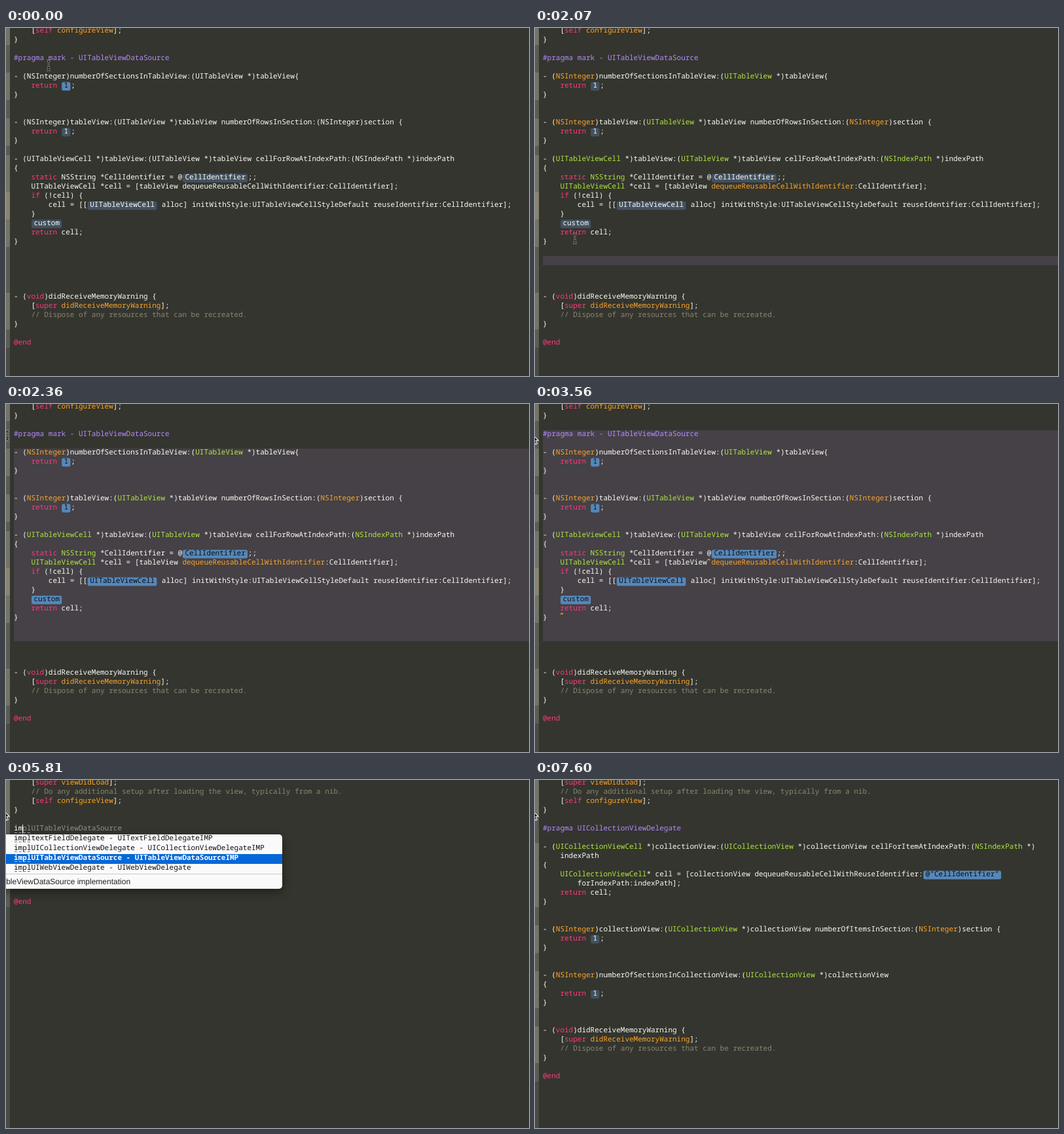
An HTML page with a canvas that plays this animation: 799 px wide and 531 px high, repeating every 8 s.

```html
<!DOCTYPE html>
<html>
<head>
<meta charset="utf-8">
<style>
html, body { margin: 0; width: 100%; height: 100%; overflow: hidden; background: #34352e; }
canvas { display: block; }
</style>
</head>
<body>
<canvas id="stage" width="799" height="531"></canvas>
<script>
const ctx = document.getElementById('stage').getContext('2d');
const W = 799, H = 531, LOOP = 8000;
const LEFT = 12, CHAR = 6.6, ROW = 14;
const MONO = '11px "Noto Sans Mono", "DejaVu Sans Mono", monospace';
const WHITE = '#fbfbf6', PINK = '#fc3a7d', ORANGE = '#fda428', GREEN = '#b0e73e',
      PURPLE = '#b48aff', GRAY = '#8a8672';
const rowTop = r => r * ROW - 2;

// ‹…› marks an editable placeholder
const setup = `    [super viewDidLoad];
    // Do any additional setup after loading the view, typically from a nib.
    [self configureView];
}
`;
const ending = `- (void)didReceiveMemoryWarning {
    [super didReceiveMemoryWarning];
    // Dispose of any resources that can be recreated.
}

@end`;
const tableDoc = `    [self configureView];
}

#pragma mark - UITableViewDataSource

- (NSInteger)numberOfSectionsInTableView:(UITableView *)tableView{
    return ‹1›;
}


- (NSInteger)tableView:(UITableView *)tableView numberOfRowsInSection:(NSInteger)section {
    return ‹1›;
}

- (UITableViewCell *)tableView:(UITableView *)tableView cellForRowAtIndexPath:(NSIndexPath *)indexPath
{
    static NSString *CellIdentifier = @‹CellIdentifier›;;
    UITableViewCell *cell = [tableView dequeueReusableCellWithIdentifier:CellIdentifier];
    if (!cell) {
        cell = [[‹UITableViewCell› alloc] initWithStyle:UITableViewCellStyleDefault reuseIdentifier:CellIdentifier];
    }
    ‹custom›
    return cell;
}





${ending}`.split('\n');
const emptyDoc = `${setup}



${ending}`.split('\n');
const collectionDoc = `${setup}
#pragma UICollectionViewDelegate

- (UICollectionViewCell *)collectionView:(UICollectionView *)collectionView cellForItemAtIndexPath:(NSIndexPath *)
    indexPath
{
    UICollectionViewCell* cell = [collectionView dequeueReusableCellWithReuseIdentifier:‹@"CellIdentifier"›
        forIndexPath:indexPath];
    return cell;
}


- (NSInteger)collectionView:(UICollectionView *)collectionView numberOfItemsInSection:(NSInteger)section {
    return ‹1›;
}


- (NSInteger)numberOfSectionsInCollectionView:(UICollectionView *)collectionView
{
    return ‹1›;
}


${ending}`.split('\n');

const choices = [
  ['impltextFieldDelegate', 'UITextFieldDelegateIMP'],
  ['implUICollectionViewDelegate', 'UICollectionViewDelegateIMP'],
  ['implUITableViewDataSource', 'UITableViewDataSourceIMP'],
  ['implUIWebViewDelegate', 'UIWebViewDelegate']
];

// [time, x, y] of the text pointer
const pointer = [
  [0, 65, 57], [890, 65, 72], [1040, 68, 140], [1190, 70, 235], [1330, 70, 335],
  [1480, 67, 393], [1630, 63, 384], [1770, 61, 366], [1920, 61, 355],
  [2070, 61, 321], [2210, 30, 182], [2360, 2, 48], [2510, 0, 40], [2660, 0, 47], [2810, 0, 55]
];
// [time, first selected row]
const selection = [[0, 99], [2070, 25], [2210, 15], [2360, 5], [2510, 3]];
const at = (steps, t) => steps.findLast(s => s[0] <= t);

function rect(x, y, w, h, color) {
  ctx.fillStyle = color;
  ctx.fillRect(x, y, w, h);
}

function text(str, x, y, color, weight = 500) {
  ctx.font = `${weight} ${MONO}`;
  ctx.fillStyle = color;
  ctx.fillText(str, x, y);
  return x + str.length * CHAR;
}

const TOKENS = /‹(?<slot>.*?)›|(?<note>\/\/.*)|(?<pragma>#pragma.*)|(?<key>@end|\b(?:static|return|if|void|self|super)\b)|(?<call>\b(?:configureView|viewDidLoad)\b)|(?<memory>(?<=super )didReceiveMemoryWarning)|(?<scalar>\b(?:NSInteger|dequeueReusableCellWithIdentifier)\b)|(?<type>\b(?:NSString|NSIndexPath|UITableView|UITableViewCell|UICollectionView|UICollectionViewCell)\b)/g;

function drawLine(line, row, s) {
  const top = rowTop(row), base = top + 9;
  const colors = {
    note: GRAY, pragma: PURPLE, key: PINK, call: ORANGE,
    memory: s.memory ? ORANGE : WHITE,
    scalar: s.types ? ORANGE : WHITE,
    type: s.types ? GREEN : WHITE
  };
  let x = LEFT, pos = 0;
  for (const m of line.matchAll(TOKENS)) {
    x = text(line.slice(pos, m.index), x, base, WHITE);
    pos = m.index + m[0].length;
    const slot = m.groups.slot;
    if (slot) {
      const on = row === s.active || row >= s.from && row < 26;
      ctx.fillStyle = on ? '#5687b9' : '#435260';
      ctx.beginPath();
      ctx.roundRect(x + .6, top + .5, slot.length * CHAR + 6.6, 13, 2.5);
      ctx.fill();
      x = text(slot, x + 4, base, on ? '#0b1016' : WHITE) + 4;
    } else {
      const kind = Object.keys(colors).find(k => m.groups[k]);
      x = text(m[0], x, base, colors[kind]);
    }
  }
  text(line.slice(pos), x, base, WHITE);
}

// Ribbon on the left: darker outside methods, lighter inside nested blocks
function drawRibbon(lines) {
  rect(0, 0, 6, H, '#4a4b45');
  let method = true, branch = false;
  lines.forEach((line, row) => {
    if (line.startsWith('- (')) method = true;
    if (line.startsWith('    if')) branch = true;
    rect(0, rowTop(row), 6, ROW, branch ? '#88846f' : method ? '#737468' : '#5b5c54');
    if (line === '    }') branch = false;
    if (line === '}') method = false;
  });
}

function dashes(x, y, color) {
  for (let i = 0; i < 4; i++) rect(x + i * CHAR + 1, y, 4, 1, color);
}

function drawPopup(picked, described) {
  ctx.save();
  ctx.shadowColor = 'rgba(0,0,0,.4)';
  ctx.shadowBlur = 14;
  ctx.shadowOffsetY = 5;
  ctx.fillStyle = '#fafafa';
  ctx.beginPath();
  ctx.roundRect(-20, 83, 442, 83, 5);
  ctx.fill();
  ctx.restore();
  choices.forEach(([name, result], i) => {
    const top = 83 + 15 * i, on = i === picked, color = on ? '#fff' : '#111';
    if (on) rect(0, top, 422, 15, '#0568d8');
    text(`${name} - ${result}`, LEFT, top + 9, color, on ? 700 : 500);
    dashes(LEFT, top + 11, on ? '#a9cbf2' : '#777');
  });
  rect(0, 143, 422, 1, '#c9c9c9');
  ctx.font = '12px "Liberation Sans", Arial, sans-serif';
  ctx.fillStyle = '#222';
  ctx.fillText(choices[described][0].slice(4) + ' implementation', -24.5, 159);
}

function drawBeam(x, y) {
  const path = new Path2D(`M${x - 3} ${y - 7.5}q3 0 3 2.5v10q0 2.5 -3 2.5M${x + 3} ${y - 7.5}q-3 0 -3 2.5M${x + 3} ${y + 7.5}q-3 0 -3 -2.5M${x - 2} ${y + 3.5}h4`);
  ctx.lineWidth = 2.4;
  ctx.strokeStyle = 'rgba(225,225,220,.75)';
  ctx.stroke(path);
  ctx.lineWidth = 1.2;
  ctx.strokeStyle = '#111';
  ctx.stroke(path);
}

function drawArrow() {
  const path = new Path2D('M-4.5 45.5V59.5L-1.2 56.5L1 61.5L3.2 60.5L1.2 55.8H5.2Z');
  ctx.fillStyle = '#111';
  ctx.fill(path);
  ctx.lineWidth = 1.1;
  ctx.strokeStyle = '#f4f4f4';
  ctx.stroke(path);
}

const caret = (x, row) => rect(x, rowTop(row), 1, ROW, '#f8f8f2');

function drawTyping(t) {
  const typed = 'im'.slice(0, t < 5210 ? 0 : t < 5360 ? 1 : 2);
  const picked = t < 6850 ? 2 : 1;
  const x = text(typed, LEFT, rowTop(5) + 9, WHITE);
  if (t >= 5810) {
    text(choices[picked][0].slice(2), x, rowTop(5) + 9, '#929289');
    dashes(LEFT, 80, '#aaa');
  }
  if (t < 6260 || t >= 6850) caret(Math.floor(x), 5);
  if (t >= 5660) drawPopup(picked, t < 7000 ? 2 : 1);
}

function draw(t) {
  const lines = t < 4760 ? tableDoc : t < 7450 ? emptyDoc : collectionDoc;
  const state = {
    types: !(t < 150 || t >= 7450 && t < 7600),
    memory: t < 4760 || t >= 5210,
    active: t < 1920 ? 6 : t >= 7450 ? 10 : -1,
    from: t < 4760 ? at(selection, t)[1] : 99
  };
  rect(0, 0, W, H, '#34352e');
  drawRibbon(lines);
  if (state.from < 26) rect(LEFT, rowTop(state.from), W, rowTop(26) - rowTop(state.from), '#454146');
  lines.forEach((line, row) => drawLine(line, row, state));

  if (t >= 1920 && t < 2070) caret(LEFT, 25);
  if (t >= 3560 && t < 4760) {
    ctx.lineWidth = 1.2;
    ctx.strokeStyle = ORANGE;
    ctx.stroke(new Path2D('M263.5 238.5l2 -2l2 2M39 321l2 -2l2 2'));
  }
  if (t >= 4760 && t < 7450) drawTyping(t);
  if (t < 3560) drawBeam(...at(pointer, t).slice(1));
  else drawArrow();
}

ctx.textRendering = 'geometricPrecision';
function tick() {
  draw(performance.now() % LOOP);
  requestAnimationFrame(tick);
}
tick();
</script>
</body>
</html>
```
